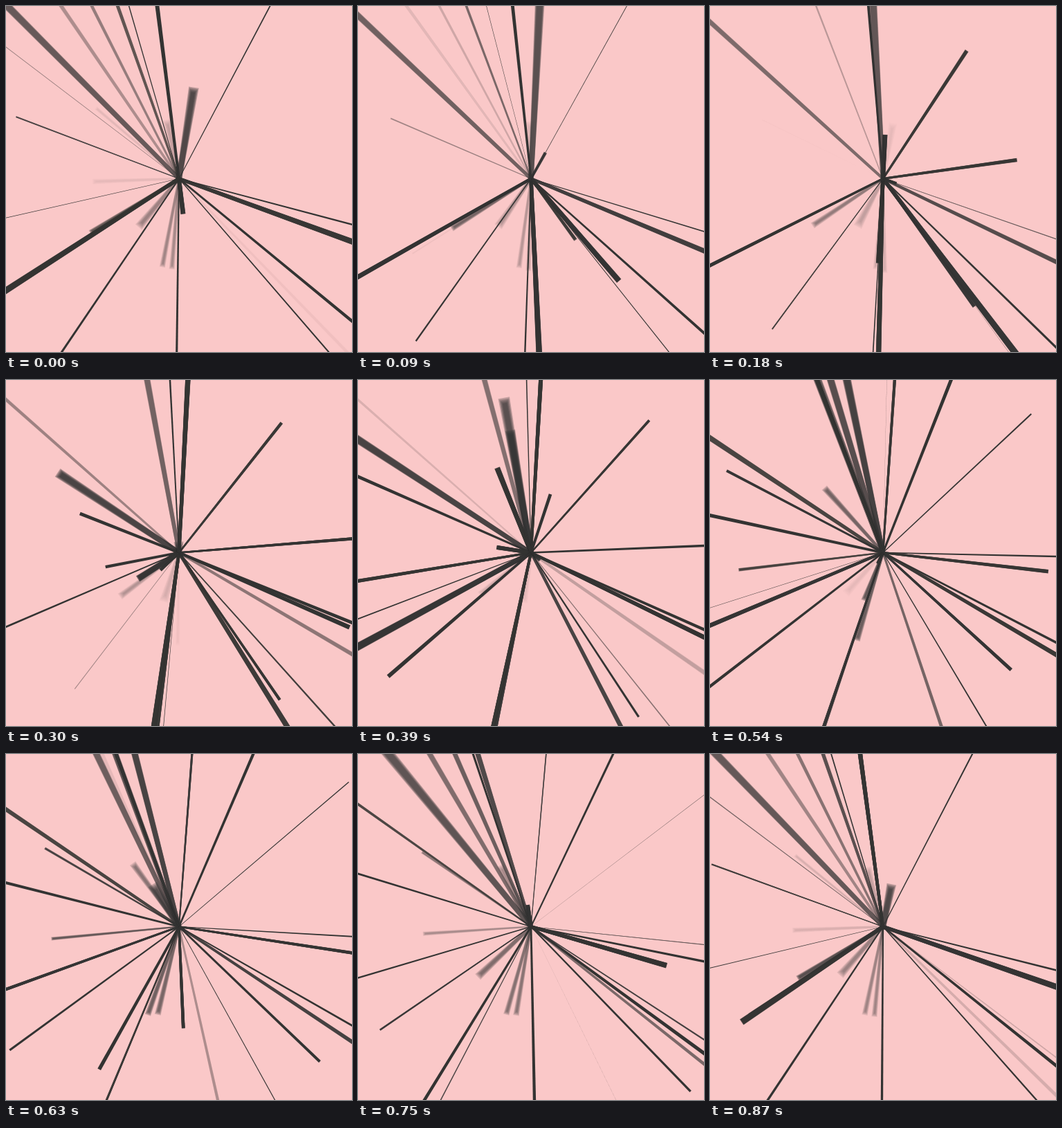
These frames come from a looping animation (500 by 500 pixels, 0.9 s). An HTML page with a canvas:

```html
<!DOCTYPE html>
<html>
<head>
<meta charset="utf-8">
<style>
  html, body { margin: 0; width: 100%; height: 100%; overflow: hidden; background: #fac8c8; }
  canvas { display: block; }
</style>
</head>
<body>
<canvas id="stage" width="500" height="500"></canvas>
<script>
const ctx = document.getElementById('stage').getContext('2d');
const LOOP = 900, STEP = 30, LIFE = 730, LAYERS = 5;
const REACH = 390, DEPTH = 1.8, WIDTH = 7;
const RAD = Math.PI / 180;

// Spikes of one length grow from the centre of a turning sphere.
// Each is a direction at half its life: clockwise from up, tilt to the viewer.
const directions = [
  [188.5, 22], [151.2, 31], [146.8, -11], [43, -14], [89.2, -4], [196.2, 19], [3.7, 17],
  [117.1, 4], [120.8, 24], [303.7, 34], [299, -18], [264.2, -27], [249.8, 15], [234, -9],
  [333.4, 54], [338.5, 46], [340.6, 11.5], [24.6, 5], [286.3, -5], [135.7, -6], [342.7, 38],
  [102.1, -3], [338.5, -55], [186.8, -43], [192.1, -43], [213.9, -8], [181, -9], [314, 51],
  [131.6, 6], [113.6, 33], [209.8, -60], [355.3, 8], [244.7, 10], [234.5, -49], [349.8, 54]
];

// Spin in degrees per second about the right, up and viewer axes.
const spin = [-10, -60, -23];
const speed = Math.hypot(...spin);
const axis = spin.map(s => s / speed);

const spikes = directions.map(([angle, tilt], i) => {
  const turn = i / directions.length;
  const flat = Math.cos(tilt * RAD);
  return {
    // Spikes are born one by one, most densely around mid-loop.
    birth: LOOP * turn - 70 + 55 * Math.cos(2 * Math.PI * (turn - 1 / 7)),
    dir: [flat * Math.sin(angle * RAD), flat * Math.cos(angle * RAD), Math.sin(tilt * RAD)]
  };
});

// Rodrigues rotation about the spin axis.
function rotate([x, y, z], angle) {
  const [a, b, c] = axis, cos = Math.cos(angle), sin = Math.sin(angle);
  const k = (a * x + b * y + c * z) * (1 - cos);
  return [
    x * cos + (b * z - c * y) * sin + a * k,
    y * cos + (c * x - a * z) * sin + b * k,
    z * cos + (a * y - b * x) * sin + c * k
  ];
}

function wedge(length, inner, outer) {
  ctx.beginPath();
  ctx.moveTo(-inner / 2, 0);
  ctx.lineTo(-outer / 2, -length);
  ctx.lineTo(outer / 2, -length);
  ctx.lineTo(inner / 2, 0);
  ctx.fill();
}

function drawSpike({ birth, dir }, time) {
  const age = (time - birth + LOOP) % LOOP;
  if (age >= LIFE) return;
  const [x, y, z] = rotate(dir, speed * RAD * (age - LIFE / 2) / 1000);
  const scale = 1 / Math.max(.25, 1 - DEPTH * z);
  const reach = REACH * Math.hypot(x, y) * scale;
  const length = Math.min(reach, 40 * (age / 30) ** 1.4);

  // Depth of field: blur spreads the ink of a thinning line.
  const ink = WIDTH * (1 - age / LIFE) * scale ** .4;
  const blur = 10 * z * z;
  const width = Math.hypot(ink, blur);
  const alpha = Math.min(.995, ink / width);
  const inner = width * .6;
  const outer = inner + (width - inner) * length / Math.min(reach, 300);

  ctx.save();
  ctx.translate(250, 249.5);
  ctx.rotate(Math.atan2(x, y));
  if (blur < .4) {
    ctx.globalAlpha = alpha;
    wedge(length, inner, outer);
  } else {
    ctx.globalAlpha = 1 - (1 - alpha) ** (1 / LAYERS);
    for (let i = 0; i < LAYERS; i++) {
      const spread = (i / (LAYERS - 1) - .5) * blur;
      wedge(Math.max(0, length + spread), inner, Math.max(.5, outer + spread * 1.3));
    }
  }
  ctx.restore();
}

function render() {
  const time = Math.floor(performance.now() % LOOP / STEP) * STEP;
  ctx.fillStyle = '#fac8c8';
  ctx.fillRect(0, 0, 500, 500);
  ctx.fillStyle = '#333332';
  for (const spike of spikes) drawSpike(spike, time);
  requestAnimationFrame(render);
}
render();
</script>
</body>
</html>
```
